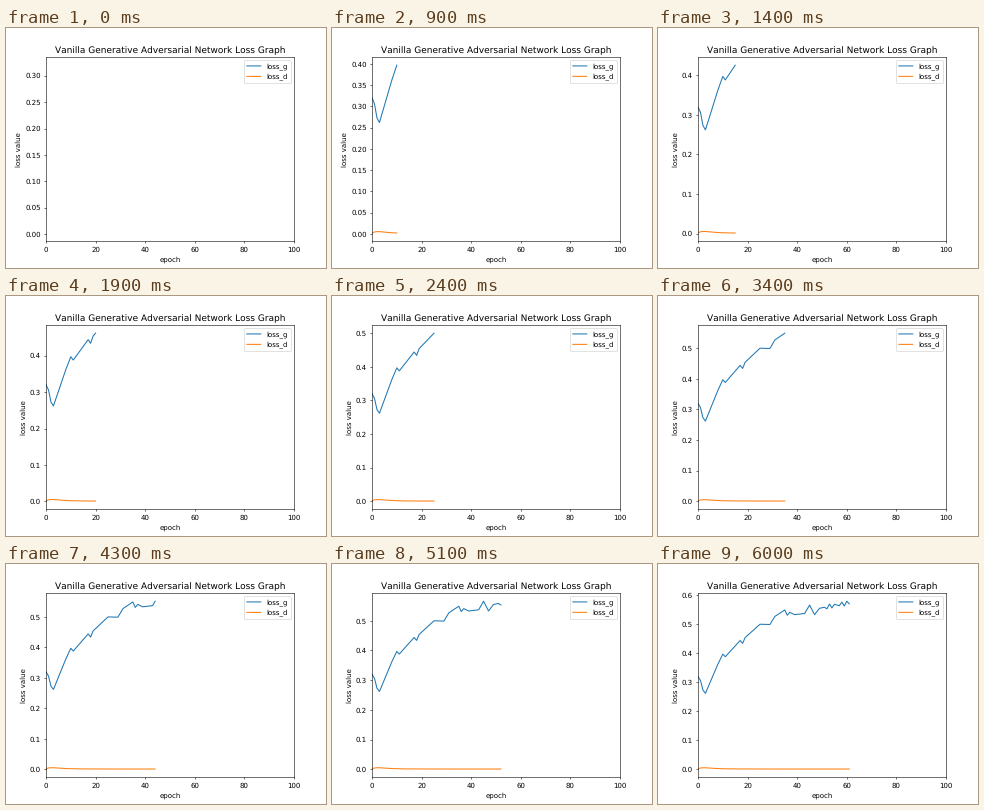
Recreate the animation shown at these times as a matplotlib script. Size 320 by 240 pixels, loop 6.1 s.

```python
import numpy as np
import matplotlib.pyplot as plt
from matplotlib.animation import FuncAnimation

plt.rcParams.update({
    "font.family": "DejaVu Sans",
    "text.hinting": "none",
    "text.hinting_factor": 1,
})

FRAMES = 61
EPOCHS = 100
RIPPLE_START = 52

# Turning points of the generator loss: (epoch, loss)
TURNS = [
    (0, 0.320), (1, 0.306), (2, 0.273), (3, 0.262), (8, 0.362), (10, 0.397),
    (11, 0.388), (17, 0.444), (18, 0.434), (19, 0.454), (25, 0.500),
    (29, 0.499), (31, 0.527), (35, 0.549), (36, 0.531), (37, 0.541),
    (39, 0.533), (43, 0.537), (45, 0.566), (47, 0.533), (49, 0.555),
    (52, 0.560), (61, 0.574),
]


def generator_loss(epoch):
    """Straight runs between the turns, with a fast ripple at the end."""
    trend = np.interp(epoch, *zip(*TURNS))
    ripple = 0.008 * np.cos(2 * np.pi * (epoch - RIPPLE_START - 1) / 2.4)
    return trend + np.where(epoch >= RIPPLE_START, ripple, 0)


def discriminator_loss(epoch):
    """A small early bump that dies away."""
    bump = epoch / 2.5 * np.exp(1 - epoch / 2.5)
    return 0.001 + 0.001 * np.exp(-epoch / 10) + 0.0035 * bump


epoch = np.arange(FRAMES + 1)
loss_g = generator_loss(epoch)
loss_d = discriminator_loss(epoch)

fig, ax = plt.subplots(figsize=(6.4, 4.8), dpi=50)
fig.subplots_adjust(bottom=0.1108)
ax.set_title("Vanilla Generative Adversarial Network Loss Graph", fontsize=12.5)
ax.set_xlabel("epoch")
ax.set_ylabel("loss value")
ax.set_xlim(0, EPOCHS)
line_g, = ax.plot([], [], label="loss_g")
line_d, = ax.plot([], [], label="loss_d")
legend = ax.legend(loc="upper right")
for handle in legend.get_lines():
    handle.set_snap(False)


def update(frame):
    # The opening frame holds a single point, so no line shows yet
    count = frame + 2 if frame else 1
    line_g.set_data(epoch[:count], loss_g[:count])
    line_d.set_data(epoch[:count], loss_d[:count])
    ax.relim()
    ax.autoscale_view(scalex=False)
    return line_g, line_d


anim = FuncAnimation(fig, update, frames=FRAMES, interval=100,
                     init_func=lambda: update(0), repeat=True, repeat_delay=0)
plt.show()
```
